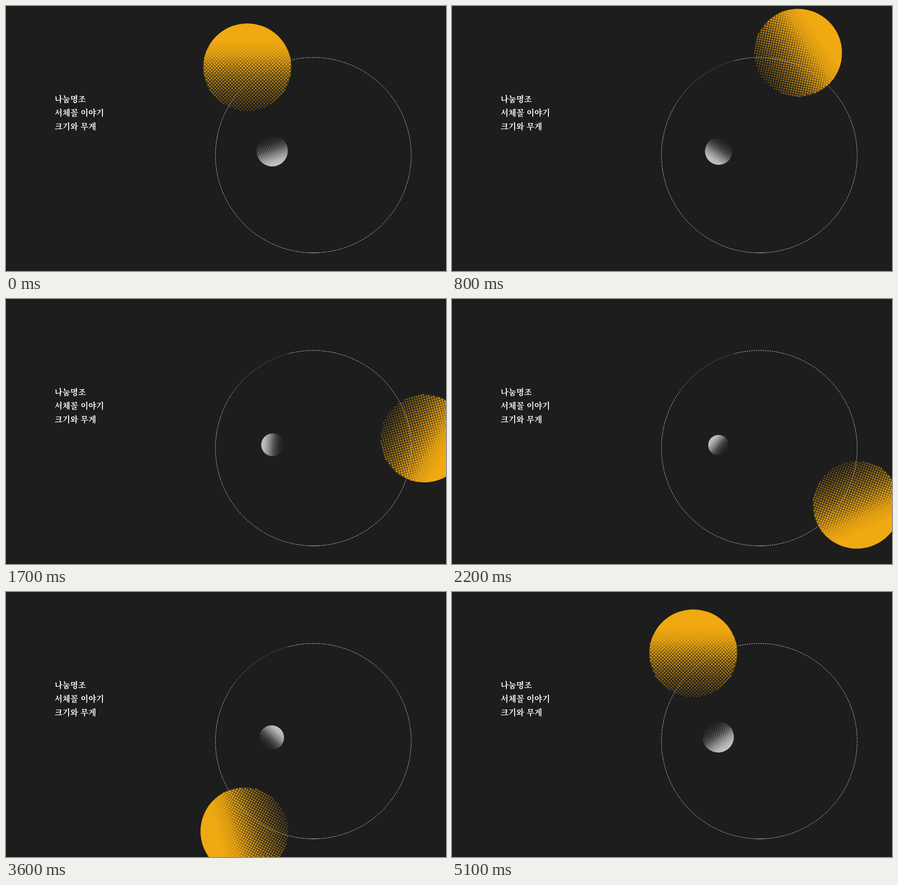
Animation, 963 px wide and 581 px high, one loop 5200 ms. Source, as an HTML page with a canvas:

```html
<!DOCTYPE html>
<html lang="ko">
<head>
<meta charset="utf-8">
<style>
  html, body { margin: 0; width: 100%; height: 100%; overflow: hidden; background: #1d1d1d; }
  canvas { position: absolute; left: 0; top: 0; display: block; }
  p {
    position: absolute; left: 106.5px; top: 188.5px; margin: 0;
    color: #fff; white-space: pre;
    font: 600 17.7px/30px "Noto Serif CJK KR", "Noto Serif KR", "Noto Sans CJK KR", "Noto Sans CJK", serif;
  }
</style>
</head>
<body>
<canvas width="963" height="581"></canvas>
<p>나눔명조
서체꼴 이야기
크기와 무게</p>
<script>
const ctx = document.querySelector('canvas').getContext('2d');
const TAU = Math.PI * 2, DEG = Math.PI / 180;
const LOOP = 5200, STEP = 100, TURN = 5100;

const ring = { x: 672.6, y: 327, r: 214.2 };
const orbit = { x: 672.4, y: 332, r: 244.4, start: -36.2 };

// fade: [position, opacity] from the solid edge to the dotted edge
const sun = {
  rgb: '240,169,18', size: 96.5, pitch: 3.71, shift: -2.6, dot: [1.9, 1.45], alpha: [0.95, 0.35],
  fade: [[0, 1], [0.2, 1], [0.35, 0.83], [0.5, 0.42], [0.65, 0.2], [0.85, 0.07], [1, 0]]
};
const moon = {
  rgb: '196,196,196', size: 34, pitch: 3, shift: 0, dot: [1.2, 1], alpha: [0.4, 0.1],
  fade: [[0, 1], [0.15, 0.92], [0.35, 0.62], [0.55, 0.24], [0.75, 0.06], [0.95, 0]]
};

const mix = (a, b, k) => a + (b - a) * k;
const clamp = k => Math.min(1, Math.max(0, k));

function disc(x, y, r) {
  ctx.beginPath();
  ctx.arc(x, y, r, 0, TAU);
  ctx.fill();
}

function drawBall(art, x, y, r, angle) {
  const { rgb, size, pitch, shift, dot, alpha, fade } = art;
  ctx.save();
  ctx.translate(x, y);
  ctx.rotate(angle * DEG);
  ctx.scale(r / size, r / size);

  const shade = ctx.createLinearGradient(0, -size, 0, size);
  for (const [at, a] of fade) shade.addColorStop(at, `rgba(${rgb},${a})`);
  ctx.fillStyle = shade;
  disc(0, 0, size);

  const n = Math.ceil(size / pitch) + 1;
  for (let j = -n; j <= n; j++) {
    const dy = j * pitch + shift;
    const v = (dy / size + 1) / 2;
    if (v < 0.12) continue;
    const k = clamp((v - 0.5) / 0.5);
    const radius = mix(dot[0], dot[1], k);
    ctx.fillStyle = `rgba(${rgb},${mix(alpha[0], alpha[1], k)})`;
    for (let i = -n; i <= n; i++) {
      const dx = i * pitch;
      if ((i + j) % 2 || Math.hypot(dx, dy) > size - radius * 0.6) continue;
      disc(dx, dy, radius);
    }
  }
  ctx.restore();
}

const ringStroke = ctx.createConicGradient(-105 * DEG, ring.x, ring.y);
for (const [at, a] of [[0, 1], [0.87, 1], [0.9, 0.65], [1, 0.25]]) {
  ringStroke.addColorStop(at, `rgba(204,204,204,${a})`);
}

function drawRing(opacity) {
  ctx.save();
  ctx.globalAlpha = opacity;
  ctx.strokeStyle = ringStroke;
  ctx.lineWidth = 1;
  ctx.setLineDash([3, 2]);
  ctx.beginPath();
  ctx.arc(ring.x, ring.y, ring.r, 90 * DEG, 450 * DEG);
  ctx.stroke();
  // the dashes meet here and look denser
  ctx.setLineDash([]);
  ctx.globalAlpha = opacity * 0.5;
  ctx.beginPath();
  ctx.arc(ring.x, ring.y, ring.r, 87 * DEG, 92 * DEG);
  ctx.stroke();
  ctx.restore();
}

function moonRadius(t) {
  return t < 2400 ? mix(34.2, 21.3, t / 2400) : mix(21.3, 34.4, (t - 2400) / 2700);
}

function draw(t) {
  const turn = t / TURN;
  const a = (orbit.start + turn * 360) * DEG;
  ctx.clearRect(0, 0, 963, 581);
  drawRing(1);
  drawBall(moon,
    582.6 + 1.2 * Math.sin(turn * TAU), 319 - 1.4 * Math.cos(turn * TAU),
    moonRadius(t), 161 + t * 0.0672);
  drawBall(sun,
    orbit.x + orbit.r * Math.sin(a), orbit.y - orbit.r * Math.cos(a),
    sun.size, turn * 360);
  drawRing(0.3);
}

const begin = performance.now();
let shown = -1;
function tick() {
  const t = (performance.now() - begin) % LOOP;
  const step = Math.floor(t / STEP);
  if (step !== shown) draw((shown = step) * STEP);
  requestAnimationFrame(tick);
}
tick();
</script>
</body>
</html>
```
